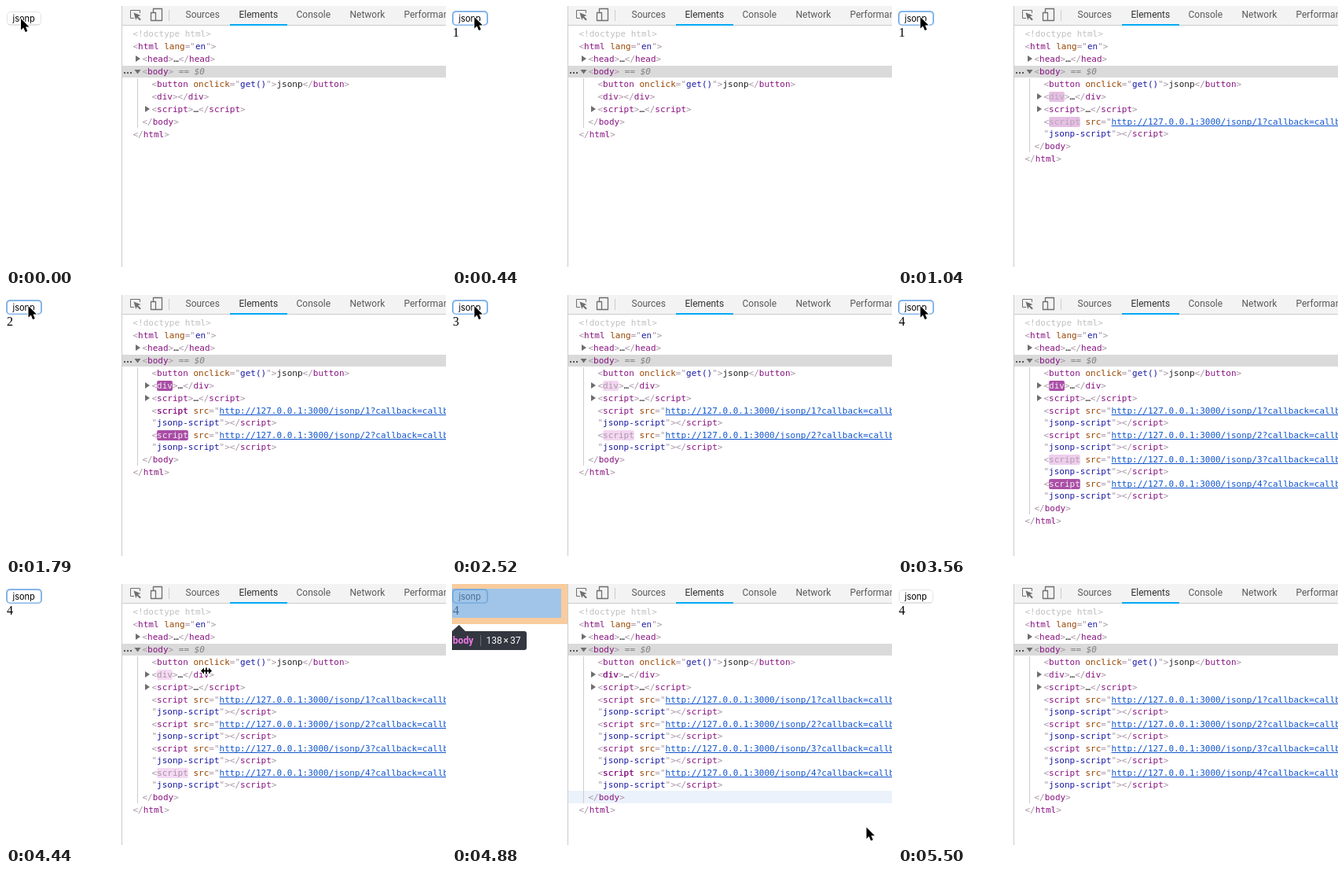
An HTML page with a canvas that plays this animation: 560 px wide and 332 px high, repeating every 5600 ms.

```html
<!DOCTYPE html>
<html lang="en">
<head>
<meta charset="utf-8">
<title>jsonp</title>
<style>
html, body { margin: 0; width: 100%; height: 100%; overflow: hidden; background: #fff; }
canvas { display: block; width: 560px; height: 332px; }
</style>
</head>
<body>
<canvas id="stage"></canvas>
<script>
const W = 560, H = 332, LOOP = 5600, TICK = 148;
const canvas = document.getElementById('stage');
const ctx = canvas.getContext('2d');
const ratio = window.devicePixelRatio || 1;
canvas.width = W * ratio;
canvas.height = H * ratio;

const MONO = '11px "DejaVu Sans Mono", monospace';
const SANS = '12px Roboto, "Liberation Sans", sans-serif';
const CELL = 6.622;
const INK = {
  bracket: '#a894a6', tag: '#881280', attr: '#994500', value: '#1a1aa6',
  link: '#1155cc', text: '#222', faint: '#c0c0c0', hint: '#808080'
};

// Times at which the page and then the element tree update
const COUNT_AT = [300, 1490, 2520, 3260];
const SCRIPT_AT = [450, 1640, 2820, 3410];
const CURSOR = [
  [0, 'arrow', 19, 16], [150, 'arrow', 28.5, 14], [4440, 'resize', 255, 110.5],
  [4590, 'arrow', 392, 196], [4740, 'arrow', 478, 266], [4880, 'arrow', 527.5, 309.5],
  [5030, 'none', 0, 0]
];

const passed = (times, t) => times.filter(at => at <= t).length;
const mix = (a, b, k) => a.map((v, i) => v + (b[i] - v) * k);
const rgb = (c, a = 1) => `rgba(${c.map(Math.round).join(',')},${a})`;

function ease(x) {
  const bez = (a, b, s) => 3 * a * s * (1 - s) ** 2 + 3 * b * s * s * (1 - s) + s ** 3;
  let lo = 0, hi = 1;
  for (let i = 0; i < 20; i++) {
    const mid = (lo + hi) / 2;
    if (bez(.25, .25, mid) < x) lo = mid; else hi = mid;
  }
  return bez(.1, 1, lo);
}

// Colours of an updated tag, by its age in ms
function flash(age) {
  if (age < 0 || age >= 1400) return null;
  const pale = [245, 219, 244], grey = [168, 148, 166];
  if (age < 1120) {
    const k = ease(age / 1120);
    return { back: rgb(mix([158, 54, 153], pale, k)), ink: rgb(mix([255, 255, 255], grey, k)) };
  }
  const k = ease((age - 1120) / 280);
  return { back: rgb(pale, 1 - k), ink: rgb(mix(grey, [136, 18, 128], k)) };
}

function rect(x, y, w, h, color) {
  ctx.fillStyle = color;
  ctx.fillRect(x, y, w, h);
}

function round(x, y, w, h, r, color) {
  ctx.beginPath();
  ctx.roundRect(x, y, w, h, r);
  ctx.fillStyle = color;
  ctx.fill();
}

function poly(points, color) {
  ctx.beginPath();
  points.forEach(([x, y]) => ctx.lineTo(x, y));
  ctx.closePath();
  ctx.fillStyle = color;
  ctx.fill();
}

function line(points, color, width) {
  ctx.beginPath();
  points.forEach(([x, y]) => ctx.lineTo(x, y));
  ctx.strokeStyle = color;
  ctx.lineWidth = width;
  ctx.stroke();
}

function text(str, x, y, color, font) {
  ctx.font = font;
  ctx.fillStyle = color;
  ctx.fillText(str, x, y);
}

// Draws pairs of string and colour name in one row centred on y
function code(x, y, ...parts) {
  for (let i = 0; i < parts.length; i += 2) {
    const str = parts[i], kind = parts[i + 1], w = str.length * CELL;
    text(str, x, y + 4, INK[kind] || kind, MONO);
    if (kind === 'link') rect(x, y + 5, w, 1, INK.link);
    x += w;
  }
}

const open = name => ['<', 'bracket', name, 'tag', '>', 'bracket'];
const close = name => ['</', 'bracket', name, 'tag', '>', 'bracket'];

function folded(x, y, name) {
  poly([[x - 8.5, y - 4], [x - 2.5, y], [x - 8.5, y + 4]], '#6e6e6e');
  code(x, y, ...open(name), '…', 'text', ...close(name));
}

function mark(x, y, name, glow) {
  if (!glow) return;
  round(x + CELL, y - 6, name.length * CELL, 13, 2, glow.back);
  code(x + CELL, y, name, glow.ink);
}

function toolbar() {
  rect(148, 0, W - 148, 25, '#f3f3f3');
  rect(148, 24, W - 148, 1, '#ccc');
  rect(147, 0, 1, H, '#ccc');
  const c = '#6e6e6e';
  line([[163, 15.5], [158.5, 15.5], [158.5, 5.5], [170.5, 5.5], [170.5, 9]], c, 1);
  poly([[162.5, 8.5], [171.5, 12], [168, 13.3], [171.8, 17], [170.3, 18.4], [166.7, 14.7], [165.3, 18]], c);
  line([[187.5, 8], [187.5, 3.5], [198.5, 3.5], [198.5, 18.5], [191, 18.5]], c, 1.3);
  ctx.strokeStyle = c;
  ctx.strokeRect(184.5, 8.5, 6, 10);
  rect(207, 5, 1, 14, '#ccc');
  const tabs = [['Sources', 228.5], ['Elements', 296.5], ['Console', 369.5], ['Network', 437.5], ['Performance', 506.5]];
  for (const [name, x] of tabs) text(name, x, 15, name === 'Elements' ? '#333' : '#5a5a5a', SANS);
  rect(285, 23, 73, 2, '#03a9f4');
}

function tree(t, now) {
  const X = [161.5, 173.5, 185.5];
  const count = passed(SCRIPT_AT, t);
  const end = 147 + 31 * count;
  const hover = t >= 4740 && t < 5030;

  rect(148, 76, W - 148, 15, '#dadada');
  if (hover) rect(148, end - 8, W - 148, 16, '#ebf2fb');
  rect(167, 92, 1, end - 84, '#ccc');

  code(X[0], 35, '<!doctype html>', 'faint');
  code(X[0], 51, '<', 'bracket', 'html', 'tag', ' lang', 'attr', '="', 'bracket', 'en', 'value', '">', 'bracket');
  folded(X[1], 67, 'head');
  for (const x of [150, 154, 158]) rect(x, 84, 2, 2, '#555');
  poly([[163.5, 81], [171.5, 81], [167.5, 86.5]], '#6e6e6e');
  code(X[1], 83, ...open('body'));
  text('== $0', X[1] + 7 * CELL, 87, INK.hint, 'italic ' + MONO);
  code(X[2], 99, '<', 'bracket', 'button', 'tag', ' onclick', 'attr', '="', 'bracket', 'get()', 'value',
    '">', 'bracket', 'jsonp', 'text', ...close('button'));

  if (count) folded(X[2], 115, 'div');
  else code(X[2], 115, ...open('div'), ...close('div'));
  if (count) mark(X[2], 115, 'div', flash(now - SCRIPT_AT[count - 1]));
  folded(X[2], 131, 'script');

  for (let i = 0; i < count; i++) {
    const y = 147 + 31 * i;
    code(X[2], y, '<', 'bracket', 'script', 'tag', ' src', 'attr', '="', 'bracket',
      `http://127.0.0.1:3000/jsonp/${i + 1}?callback=callback`, 'link');
    code(X[2], y + 15, '"', 'bracket', 'jsonp-script', 'value', '">', 'bracket', ...close('script'));
    mark(X[2], y, 'script', flash(now - SCRIPT_AT[i]));
  }
  code(X[1], end, ...close('body'));
  code(X[0], end + 16, ...close('html'));
}

function page(t) {
  const focused = t >= COUNT_AT[0] && t < 5500;
  if (focused) round(0, 6, 46, 19, 5, '#86b5ea');
  else round(1.5, 7.5, 43, 17, 4.5, '#c8c8c8');
  round(2, 8, 42, 15.5, 3.5, '#fff');
  text('jsonp', 8.5, 20, '#000', '11px Inter, Roboto, sans-serif');
  const n = passed(COUNT_AT, t);
  if (n) text(n, 1, 39, '#000', '16px "Liberation Serif", serif');
}

function inspector() {
  const margin = 'rgba(246,178,107,.66)';
  rect(0, 0, 147, 6, margin);
  rect(139, 6, 8, 37, margin);
  rect(0, 43, 147, 8, margin);
  rect(0, 6, 139, 37, 'rgba(111,168,220,.66)');
  const dark = '#333740';
  poly([[0, 60], [9, 52], [17, 60]], dark);
  round(-5, 60, 100, 24, 3, dark);
  text('body', 1, 76, '#ee78e6', 'bold ' + SANS);
  rect(36, 65, 1, 14, '#666a72');
  text('138', 43.5, 76, '#fff', SANS);
  text('×', 65.5, 76, '#fff', SANS);
  text('37', 74, 76, '#fff', SANS);
}

function pointer(t) {
  const [, kind, x, y] = CURSOR[passed(CURSOR.map(c => c[0]), t) - 1];
  if (kind === 'none') return;
  const shape = kind === 'arrow'
    ? [[0, 0], [0, 14.5], [3.3, 11.5], [5.6, 17], [8.3, 15.9], [6, 10.6], [10.4, 10.4]]
    : [[-7, 0], [-3, -4], [-3, -1], [-1, -1], [-1, -4], [1, -4], [1, -1], [3, -1], [3, -4],
      [7, 0], [3, 4], [3, 1], [1, 1], [1, 4], [-1, 4], [-1, 1], [-3, 1], [-3, 4]];
  const points = shape.map(([px, py]) => [x + px, y + py]);
  ctx.lineJoin = 'round';
  line([...points, points[0]], '#fff', 2);
  poly(points, '#000');
}

function draw(ms) {
  const t = ms % LOOP;
  ctx.setTransform(ratio, 0, 0, ratio, 0, 0);
  rect(0, 0, W, H, '#fff');
  page(t);
  toolbar();
  tree(t, Math.floor(t / TICK) * TICK + 6);
  if (t >= 4740 && t < 5030) inspector();
  pointer(t);
}

const start = performance.now();
function loop() {
  draw(performance.now() - start);
  requestAnimationFrame(loop);
}
loop();
</script>
</body>
</html>
```
